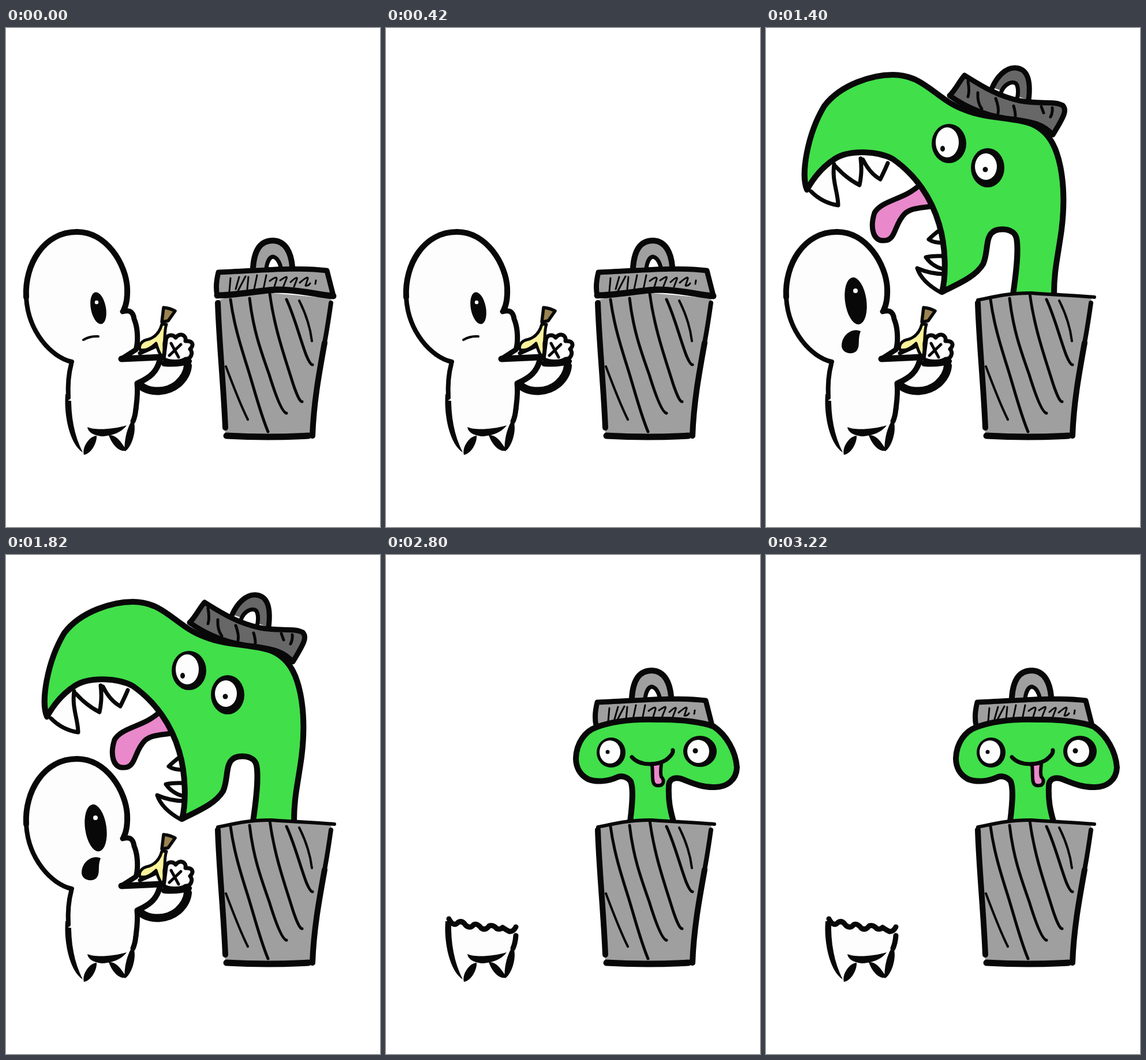
An HTML page that plays this animation: 648 px wide and 864 px high, repeating every 3.5 s.

```html
<!DOCTYPE html>
<html lang="en">
<head>
<meta charset="utf-8">
<title>Hungry trash can</title>
<style>
  html, body { margin: 0; height: 100%; overflow: hidden; background: #fff; }
  svg { display: block; width: 100vw; height: 100vh; fill: none; stroke: #080808; stroke-width: 9; stroke-linecap: round; stroke-linejoin: round; }
  .ink { fill: #080808; stroke: none; }
  .skin { fill: #fdfdfd; }
  .green { fill: #41df4a; }
  .gray { fill: #9f9f9f; }
  .dark { fill: #676767; }
  .pink { fill: #e988cb; }
  .bare { stroke: none; }
  .thin { stroke-width: 5; }
  .mid { stroke-width: 7; }
  .bold { stroke-width: 11; }
  .fat { stroke-width: 14; }
</style>
</head>
<body>
<svg viewBox="0 0 648 864">
  <!-- Legs -->
  <g data-on="0124">
    <path class="skin bare" d="M108 632C108 670 116 710 130 732L153 708 182 706 206 730 220 682 227 645 165 645Z"/>
    <path d="M225 659Q224 672 220 681"/>
    <path class="ink" d="M103 634L113 634C112 672 118 705 133 735C110 720 100 670 103 634Z"/>
    <path class="ink" d="M135 739C131 726 145 706 157 706C158 718 147 738 135 739Z"/>
    <path class="ink" d="M178 705C192 704 200 718 209 731C197 736 184 722 178 705ZM216 683L222 683C226 702 216 728 206 733C204 715 210 694 216 683Z"/>
    <path class="ink" d="M141 691C155 697 185 695 209 688C200 701 180 707 165 707C152 705 142 700 141 691Z"/>
  </g>
  <path data-on="4" d="M109 630Q117 645 125 636Q132 632 138 641Q146 648 152 640Q158 637 165 646Q172 651 179 642Q186 640 192 647Q198 649 202 645Q208 649 214 652Q221 652 225 644"/>

  <!-- Upper body, head and rubbish -->
  <g data-on="012">
    <path class="skin bare" d="M113 578C106 605 107 625 108 645L222 660 227 612C250 605 262 595 268 573L199 573Z"/>
    <path class="skin bare" d="M113 578C78 570 38 525 35 466C32 410 65 353 123 353C175 353 208 410 210 450Q211 475 202 490C212 487 220 490 222 505C230 520 231 545 225 556L199 574Z"/>
    <path stroke-width="8" d="M114 578C78 570 38 525 35 466"/>
    <path stroke-width="10" d="M35 466C32 410 65 353 123 353C175 353 208 410 210 450Q211 475 204 488"/>
    <path d="M202 491C212 488 220 489 222 504C229 520 229 545 225 557L200 573"/>
    <path class="bold" d="M200 573L265 570"/>
    <path stroke-width="8" d="M113 582C108 600 107 620 108 640"/>
    <path d="M227 615C229 635 226 650 225 660"/>
    <path class="skin bare" d="M228 614C245 628 275 628 300 616C313 605 320 595 318 578L268 580Q258 605 228 614Z"/>
    <path class="fat" d="M234 620C250 632 279 632 298 616C309 606 314 596 315 585"/>
    <path stroke-width="10" d="M267 573C262 595 250 605 230 614M274 581Q300 583 317 577"/>
    <path class="skin mid" d="M273 573L277 541C278 530 290 530 294 536C301 527 313 531 311 542C324 541 326 549 319 556C325 563 320 574 311 573C304 578 284 580 273 573Z"/>
    <path class="thin" d="M286 546L299 570M303 548L283 567"/>
    <path class="mid" d="M232 563L259 551"/>
    <path fill="#fdf39b" stroke-width="5" d="M270 513C266 528 258 537 243 540C233 543 230 551 232 557C242 560 252 554 260 546C263 556 266 566 271 569C276 562 273 552 274 545C276 538 274 525 278 513Z"/>
    <path fill="#9a8350" stroke-width="5.5" d="M273 484Q284 485 293 490L281 507 270 509Z"/>
  </g>
  <g data-on="01">
    <ellipse class="ink" cx="160" cy="485" rx="13" ry="28" transform="rotate(-11 160 485)"/>
    <circle class="skin bare" cx="157" cy="475" r="3.2"/>
  </g>
  <path data-on="0" stroke-width="4" d="M134 540Q146 533 160 534"/>
  <path data-on="1" class="ink" d="M123 540C124 532 155 533 161 534C166 552 155 566 143 565C132 565 123 555 123 540Z"/>
  <g data-on="2">
    <ellipse class="ink" cx="155.500" cy="472.500" rx="18.500" ry="41" transform="rotate(-8 155.500 472.500)"/>
    <circle class="skin bare" cx="155" cy="455" r="4"/>
    <path class="ink" d="M164 525C150 519 132 530 131 550C131 562 148 568 157 559C164 550 158 540 164 525Z"/>
  </g>

  <!-- Lid -->
  <g id="lid" data-on="014">
    <path class="gray" stroke-width="10" d="M428 415C430 385 440 368 463 368C485 369 494 390 496 413"/>
    <path class="mid" fill="#fff" d="M451 416C453 402 458 396 463 396C470 398 474 406 476 414"/>
    <path class="gray bare" d="M368 423C430 421 500 412 558 419L568 462Q460 446 366 463Z"/>
    <path d="M366 463C363 450 365 435 368 423C430 421 500 413 556 420L567 463"/>
    <path stroke-width="3" d="M389 433L387 456M404 431L398 452M415 430L402 455M420 431L418 452M435 428L430 452M451 428L446 452M457 438Q470 428 469 435L461 461M475 437Q489 427 486 434L480 449M493 440Q506 428 504 435L499 448M509 441Q524 428 523 434L519 446Q524 447 527 442M537 437L536 443"/>
  </g>

  <!-- Monster: peeking out -->
  <g data-on="14">
    <path class="green" stroke-width="10" d="M423 461C427 430 429 405 424 392C418 384 408 381 400 385C385 392 365 394 350 388C335 380 329 366 329 352C330 325 345 305 365 298C400 285 440 284 470 285C510 284 550 290 568 297C590 312 606 340 608 368C607 390 590 402 570 402C545 403 525 392 510 387C497 384 490 390 490 400C489 425 492 440 498 461"/>
    <ellipse class="ink" cx="390" cy="342" rx="25" ry="26"/>
    <ellipse class="skin bare" cx="388" cy="341" rx="18" ry="20"/>
    <circle class="ink" cx="384" cy="341" r="3.500"/>
    <ellipse class="ink" cx="544" cy="340" rx="29" ry="27"/>
    <ellipse class="skin bare" cx="541" cy="340" rx="19" ry="20"/>
    <circle class="ink" cx="536" cy="339" r="4.500"/>
    <path class="pink" stroke-width="6" d="M461 364C463 380 459 398 469 399C482 401 483 390 477 384C475 378 476 370 477 362"/>
    <path class="mid" d="M426 350C440 366 470 364 485 355C494 348 498 342 497 338"/>
  </g>

  <!-- Monster: jaws open -->
  <g data-on="2">
    <path class="skin mid" d="M78 283Q98 303 125 307C125 285 114 265 118 236M121 240Q140 261 162 272Q167 250 164 226M168 228Q180 252 198 262Q205 248 211 234M302 349Q290 358 282 366Q290 372 308 372M308 395Q290 394 277 397Q290 415 311 418M310 426Q285 426 262 416Q270 440 303 458"/>
    <path class="pink" d="M266 272C240 297 200 298 188 320C180 345 185 370 205 368C225 368 222 340 240 322C250 312 265 312 284 309"/>
    <path class="green" stroke-width="10" d="M428 461C434 420 438 385 434 364C430 346 402 345 392 354C380 364 385 390 376 409C362 432 330 444 305 457C312 430 312 380 300 340C287 295 260 255 220 227C195 213 145 210 120 226C98 240 82 260 71 280C60 255 71 185 101 135C130 97 185 81 220 81C275 81 295 125 345 142C380 157 435 155 462 167C495 182 505 215 510 240C516 270 517 310 512 350C505 400 499 420 499 461"/>
    <ellipse class="ink" cx="317" cy="200" rx="30" ry="34"/>
    <ellipse class="skin bare" cx="314" cy="198" rx="20" ry="26"/>
    <ellipse class="ink" cx="306" cy="209" rx="4" ry="5"/>
    <ellipse class="ink" cx="384" cy="242" rx="29" ry="34"/>
    <ellipse class="skin bare" cx="381" cy="240" rx="19" ry="23"/>
    <circle class="ink" cx="380" cy="245" r="4.500"/>
    <path class="dark" d="M392 103C400 85 415 68 432 69C450 70 460 85 455 125"/>
    <path class="mid" fill="#fff" d="M407 112C412 98 425 91 433 96C438 102 437 115 435 123"/>
    <path class="dark" d="M344 82C370 98 400 118 440 126C470 132 500 126 514 134C522 142 517 152 497 185C480 165 460 163 430 158C390 155 350 140 318 117C328 108 335 92 344 82Z"/>
    <path class="thin" d="M350 92Q353 110 350 119M367 112Q366 130 374 140M398 122Q404 138 402 148M429 135Q432 145 432 152M477 136L481 147M496 138Q497 146 493 154"/>
  </g>

  <!-- Monster: mouth shut over its meal -->
  <g data-on="3">
    <path class="skin bare" d="M108 605C104 650 112 705 137 732L155 709 184 709 207 730 224 640Z"/>
    <path stroke-width="8" d="M108 605C104 650 112 705 137 732L153 710M184 711Q193 730 207 729C212 715 216 680 225 643"/>
    <path d="M145 695C150 705 165 704 175 704C185 703 195 704 201 699"/>
    <path class="green bare" d="M80 585C45 525 18 400 18 310C20 170 90 85 200 84C270 86 290 130 335 141C380 150 440 152 473 180C500 210 511 255 512 300C511 360 505 410 497 461L427 461C427 420 425 405 416 394C402 380 365 385 342 420C320 455 320 510 303 555C295 585 290 603 270 618C250 632 235 638 215 637C180 630 140 615 110 602Z"/>
    <path class="fat" d="M80 585C45 525 18 400 18 310C20 170 90 85 200 84C270 86 290 130 335 141C380 150 440 152 473 180C500 210 511 255 512 300C511 360 505 410 497 456"/>
    <path stroke-width="8" d="M427 456C427 420 425 405 416 394C402 380 365 385 342 420C320 455 320 510 303 555C295 585 290 603 270 618C250 632 235 638 215 637C180 630 140 615 110 602L82 588"/>
    <path class="skin bold" d="M157 457Q150 430 154 416Q165 417 185 428M198 427Q215 447 231 441Q238 428 237 414M156 480Q171 510 173 535Q157 546 136 531M107 548Q98 525 102 512Q115 510 130 521M121 553Q132 580 128 596Q110 605 85 588"/>
    <path class="fat" d="M82 584C110 567 132 530 150 492C163 452 182 425 206 413C240 406 293 380 298 340"/>
    <path class="ink" d="M292 326Q299 320 304 333L304 344 291 340Z"/>
    <ellipse class="ink" cx="187.500" cy="201" rx="40" ry="39.500"/>
    <circle class="skin bare" cx="186" cy="200" r="31"/>
    <circle class="ink" cx="185" cy="197" r="6"/>
    <ellipse class="ink" cx="264" cy="271" rx="36" ry="37.500"/>
    <ellipse class="skin bare" cx="263" cy="270" rx="24.500" ry="25.500"/>
    <ellipse class="ink" cx="264" cy="270" rx="5" ry="6"/>
  </g>

  <!-- Can -->
  <path class="gray bare" d="M368 471C400 460 440 457 460 459L564 468C552 540 535 610 531 706L380 706Z"/>
  <path stroke-width="10" d="M367 476C369 540 377 620 380 692M552 545C542 600 533 650 531 706"/>
  <path stroke-width="8" d="M563 476Q558 512 552 545"/>
  <path class="bold" d="M382 706Q455 710 524 706"/>
  <path class="thin" d="M389 470C395 515 408 555 420 593C432 632 441 668 454 699M422 468C428 520 440 555 456 600Q476 665 486 667M457 460C465 520 483 570 497 615Q508 648 513 647M486 470C500 500 510 540 520 566Q527 583 531 583"/>
  <path stroke-width="4" d="M381 586C390 610 405 650 419 678M508 472Q526 508 530 542"/>
  <path data-on="1234" stroke-width="6" d="M367 471C385 468 420 458 460 459C500 462 535 463 569 466"/>
  <path data-on="0" class="bold" d="M366 463C400 463 440 454 470 453C510 453 540 462 567 464"/>
</svg>
<script>
  const parts = [...document.querySelectorAll("[data-on]")];
  const lid = document.getElementById("lid");
  const POSE_MS = 700, POSES = 5;

  function draw() {
    const pose = Math.floor(performance.now() / POSE_MS) % POSES;
    for (const part of parts) {
      part.style.display = part.dataset.on.includes(pose) ? "" : "none";
    }
    lid.setAttribute("transform", pose ? "translate(-2 -168)" : "");
    requestAnimationFrame(draw);
  }
  draw();
</script>
</body>
</html>
```
